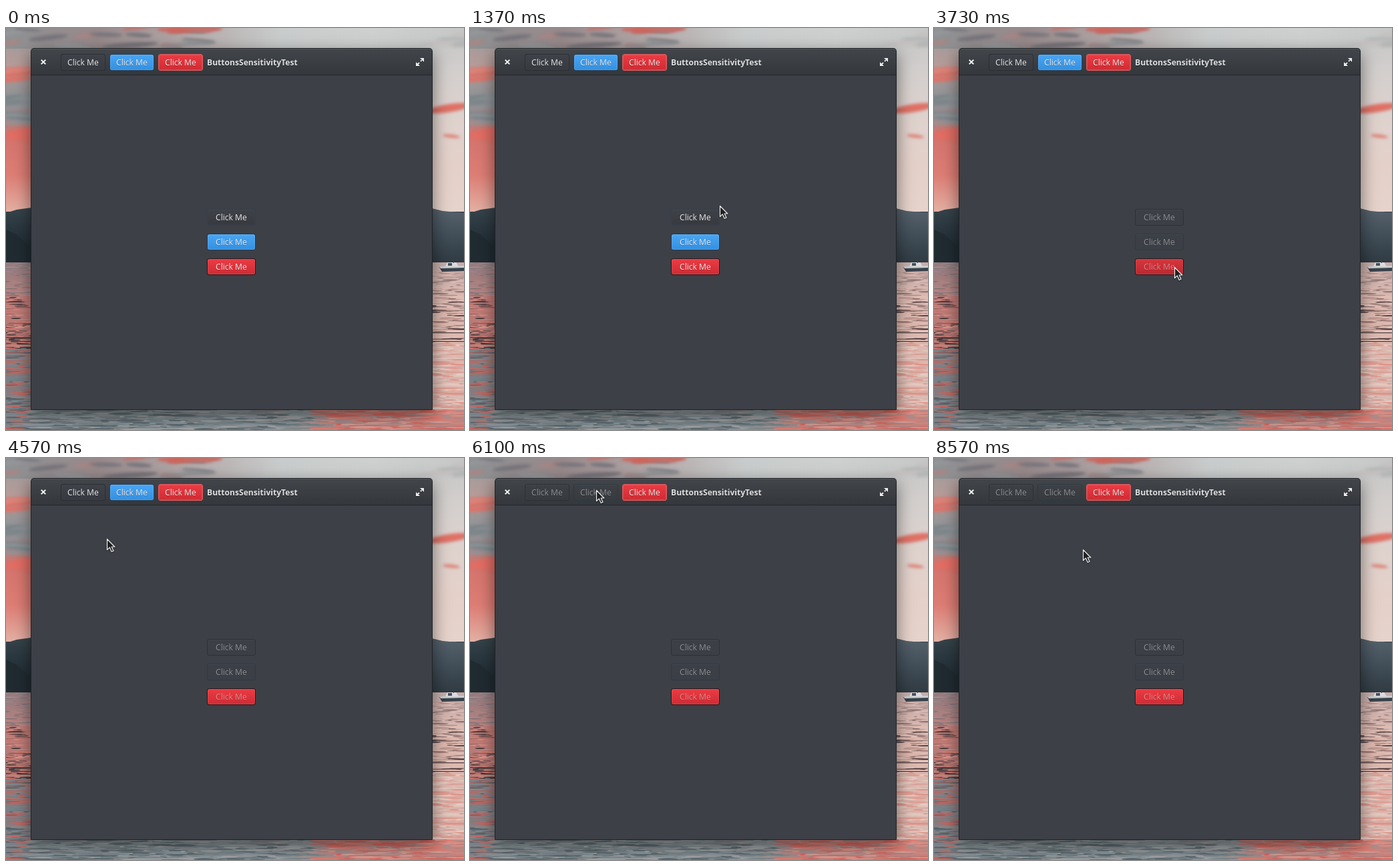
An HTML page with a canvas for the animation above (9310 ms loop, 686 by 602 pixels).

```html
<!DOCTYPE html>
<html lang="en">
<head>
<meta charset="utf-8">
<title>ButtonsSensitivityTest</title>
<style>
html, body { margin: 0; width: 100%; height: 100%; overflow: hidden; background: #3d4047; }
canvas { display: block; }
</style>
</head>
<body>
<canvas id="stage" width="686" height="602"></canvas>
<script>
const W = 686, H = 602, LOOP = 9310;
const FONT = '12.1px "Open Sans", "Noto Sans", sans-serif';
const stage = document.getElementById('stage').getContext('2d');
let g = stage;

const clamp = v => Math.max(0, Math.min(1, v));
const ramp = (t, start, length) => clamp((t - start) / length);
const easeOut = u => 1 - (1 - u) ** 2;

let seed = 97;
const random = () => (seed = (seed * 16807) % 2147483647) / 2147483647;
const between = (a, b) => a + (b - a) * random();
const pick = list => list[Math.floor(random() * list.length)];

function blend(x0, y0, x1, y1, colors) {
  const fill = g.createLinearGradient(x0, y0, x1, y1);
  colors.forEach((c, i) => fill.addColorStop(i / (colors.length - 1), c));
  return fill;
}
const down = (y0, y1, ...colors) => blend(0, y0, 0, y1, colors);
const across = (...colors) => blend(0, 0, W, 0, colors);

function rect(x, y, w, h, fill) {
  g.fillStyle = fill;
  g.fillRect(x, y, w, h);
}

function box(x, y, w, h, r, fill) {
  g.beginPath();
  g.roundRect(x, y, w, h, r);
  g.fillStyle = fill;
  g.fill();
}

function outline(x, y, w, h, r, color) {
  g.beginPath();
  g.roundRect(x + .5, y + .5, w - 1, h - 1, r);
  g.strokeStyle = color;
  g.lineWidth = 1;
  g.stroke();
}

function shape(color, ...points) {
  g.beginPath();
  points.forEach(([x, y]) => g.lineTo(x, y));
  g.closePath();
  g.fillStyle = color;
  g.fill();
}

function oval(x, y, rx, ry, color, tilt = 0) {
  g.beginPath();
  g.ellipse(x, y, rx, ry, tilt, 0, Math.PI * 2);
  g.fillStyle = color;
  g.fill();
}

function clouds(count, x0, x1, y0, y1, colors) {
  for (let i = 0; i < count; i++) {
    oval(between(x0, x1), between(y0, y1), between(14, 45), between(2, 5), pick(colors), between(-.2, .15));
  }
}

// Ripples grow longer and thicker towards the viewer.
function ripples(x0, x1, y0, y1, colors) {
  const count = (x1 - x0) * (y1 - y0) / 26;
  for (let i = 0; i < count; i++) {
    const y = between(y0, y1), depth = (y - 350) / 250;
    oval(between(x0, x1), y, between(3, 12 + 16 * depth), between(.3, .6 + depth), pick(colors));
  }
}

function drawSky() {
  const mid = W / 2;
  rect(0, 0, mid, 275, down(0, 275, '#989b9d', '#b59c99', '#8c9296', '#d4746c', '#dd7d74', '#e4b0a4'));
  rect(mid, 0, mid, 275, down(0, 275, '#c3c5c5', '#d3cfcd', '#dfd2cd', '#e4d0c9', '#e6d3cb'));
  rect(0, 0, W, 31, across('#8f9294', '#97898b', '#b3a8a8', '#c9cccc', '#ced0cf', '#c6c7c7'));
  g.filter = 'blur(2px)';
  clouds(14, 0, 330, 0, 30, ['#77747b', '#94979a', '#a98585']);
  clouds(7, 170, 310, -2, 5, ['#cb665e', '#c1706a']);
  clouds(5, -10, 20, 62, 85, ['#dc7369', '#d9857a']);
  clouds(8, -10, 30, 98, 142, ['#7d868b', '#8e9599']);
  clouds(3, 0, 40, 155, 172, ['#e16d64']);
  clouds(5, 650, 690, 0, 25, ['#b4b5b6', '#c5c1c0']);
  oval(664, 120, 34, 6, '#df7166', -.15);
  oval(667, 162, 13, 2.5, '#dd8378', .12);
  g.filter = 'none';
}

function drawShore() {
  shape(down(270, 350, '#37434b', '#26323a', '#1c262c'),
    [0, 277], [16, 272], [38, 269], [38, 351], [0, 351]);
  shape('#202b31', [0, 302], [15, 309], [38, 329], [38, 351], [0, 351]);
  shape(down(270, 352, '#56616b', '#414e58', '#2f3a42'),
    [638, 270], [654, 274], [686, 277], [686, 354], [638, 354]);
}

function drawWater() {
  const mid = W / 2;
  rect(0, 351, mid, 251, down(350, 602, '#8c7c81', '#c4807b', '#a8716e', '#857a7e', '#778388'));
  rect(mid, 351, mid, 251, down(350, 602, '#c6adaa', '#dcbab1', '#dbb7ae', '#e1c3ba', '#c49b95'));
  rect(0, 571, W, 31, across('#7d7f83', '#7b868b', '#8b9093', '#a68a88', '#c88179'));
  ripples(0, 40, 352, 402, ['#a38a8c', '#7d7379', '#c48982']);
  ripples(0, 40, 402, 480, ['#353236', '#5c4447', '#d67e74', '#dd9388', '#c1726c']);
  ripples(0, 40, 480, 602, ['#75838a', '#566269', '#c9645c', '#8d8487']);
  ripples(636, W, 366, 405, ['#b08b88', '#e2beb4', '#836a6c']);
  ripples(636, W, 405, 470, ['#463a3d', '#a17874', '#e4c4bb', '#dfb4aa']);
  ripples(636, W, 470, 572, ['#e6cbc2', '#d6b1a9', '#df9489']);
  ripples(40, 470, 571, H, ['#76848a', '#8b979c', '#5b686e', '#a0a2a4']);
  ripples(470, W, 571, H, ['#d4675f', '#df7b71', '#a98c8b', '#d59b93']);
  for (const [x, y] of [[0, 463], [638, 456], [638, 469]]) rect(x, y, 48, 1, '#3a3034');
}

function drawBoat() {
  shape('#38424b', [649, 358], [686, 357], [686, 364], [653, 365]);
  shape('#c9cdd0', [649, 357], [686, 356], [686, 359], [651, 360]);
  shape('#dcdcdd', [658, 357], [661, 351], [674, 351], [678, 357]);
  rect(662, 352, 6, 4, '#46515b');
  rect(670, 346, 1, 6, '#3b434a');
}

function drawWindow() {
  g.save();
  g.shadowColor = 'rgba(0,0,0,.5)';
  g.shadowBlur = 26;
  g.shadowOffsetY = 8;
  box(37, 30, 602, 542, [5, 5, 1, 1], '#1f2226');
  g.restore();
  box(38, 31, 600, 540, [4, 4, 0, 0], '#3d4047');
  box(38, 31, 600, 39, [4, 4, 0, 0], down(31, 70, '#42454a', '#34373b'));
  rect(41, 31, 594, 1, 'rgba(255,255,255,.09)');
  rect(38, 70, 600, 1, '#24272b');
  drawIcons();
  g.font = 'bold ' + FONT;
  label('ButtonsSensitivityTest', 301, 56, '#dedfe0', .45);
}

function drawIcons() {
  const white = '#f0f0f0';
  g.save();
  g.shadowColor = 'rgba(0,0,0,.5)';
  g.shadowOffsetY = 1;
  g.strokeStyle = white;
  g.lineWidth = 2;
  g.beginPath();
  for (const s of [-1, 1]) {
    g.moveTo(56 - 3.3 * s, 47.7);
    g.lineTo(56 + 3.3 * s, 54.3);
    g.moveTo(620 + s, 51 - s);
    g.lineTo(620 + 4.5 * s, 51 - 4.5 * s);
  }
  g.stroke();
  for (const s of [-1, 1]) shape(white, [620, 51 - 6 * s], [620 + 6 * s, 51 - 6 * s], [620 + 6 * s, 51]);
  g.restore();
}

function label(text, x, y, color, shade) {
  g.fillStyle = `rgba(0,0,0,${shade})`;
  g.fillText(text, x, y + 1);
  g.fillStyle = color;
  g.fillText(text, x, y);
}

const LOOKS = [
  { top: '#3f4248', bottom: '#36393f', barEdge: '#282b30', edge: '#2b4057', offEdge: '#2d3035', gloss: .025 },
  { top: '#4ba7f6', bottom: '#338fdf', barEdge: '#24435f', edge: '#24384c', offEdge: '#2e3a43', gloss: .13 },
  { top: '#ed3c44', bottom: '#cf2a33', barEdge: '#dc5b60', edge: '#2c1518', stays: true, gloss: .1 }
];
const BAR_CLICKS = [5070, 5770, 6770], BODY_CLICKS = [1670, 2780, 3610];

const BUTTONS = LOOKS.flatMap((look, i) => [
  { look, x: 82 + 73 * i, y: 39, w: 67, pad: 10, edge: look.barEdge, click: BAR_CLICKS[i], bar: true },
  { look, x: 301, y: Math.round(270.5 + 37 * i), w: 73, pad: 13, edge: look.edge, click: BODY_CLICKS[i] }
]);

function drawButton({ look, x, y, w, pad, edge, click, bar }, t) {
  const h = 25, textOff = ramp(t, click + 50, 80), off = ramp(t, click + 130, 180);
  const pressed = ramp(t, click, 50) * (1 - off);

  if (!look.stays) {
    g.globalAlpha = off;
    box(x + 1, y + 1, w - 2, h - 2, 2, bar ? down(y, y + h, '#3d4045', '#373a3e') : '#3c3f46');
    outline(x, y, w, h, 2.5, look.offEdge);
    rect(x + 2, y + 1, w - 4, 1, 'rgba(255,255,255,.04)');
    g.globalAlpha = 1 - off;
  }
  box(x + 1, y + 1, w - 2, h - 2, 2, down(y, y + h, look.top, look.bottom));
  outline(x, y, w, h, 2.5, edge);
  outline(x + 1, y + 1, w - 2, h - 2, 1.5, `rgba(255,255,255,${look.gloss})`);
  rect(x + 1, y + 1, w - 2, h - 2, `rgba(0,0,0,${.09 * pressed})`);

  const fade = bar && look.stays ? 0 : textOff;
  g.font = FONT;
  g.globalAlpha = 1 - fade;
  label('Click Me', x + pad, y + 17, '#ececed', .3);
  g.globalAlpha = fade;
  label('Click Me', x + pad, y + 17, look.stays ? '#d98d8e' : '#8e9094', .22);
  g.globalAlpha = 1;
}

// Each move eases to its goal along an arc given by its bend.
const MOVES = [
  { start: 770, end: 1530, to: [352, 277], bend: [50, -118] },
  { start: 2170, end: 2570, to: [348, 326], bend: [34, 22] },
  { start: 3230, end: 3630, to: [360, 358], bend: [10, 0] },
  { start: 4130, end: 5030, to: [112, 48], bend: [-35, -10] },
  { start: 5330, end: 5630, to: [189, 48], bend: [-6, 4] },
  { start: 6330, end: 6600, to: [247, 50], bend: [60, 6] },
  { start: 7630, end: 7870, to: [223, 137], bend: [45, 0] }
];

function pointerAt(t) {
  let spot = [690, 405];
  for (const { start, end, to, bend } of MOVES) {
    const e = easeOut(ramp(t, start, end - start));
    spot = spot.map((from, k) => from + (to[k] - from) * e + bend[k] * Math.sin(Math.PI * e));
    if (e < 1) break;
  }
  return spot.map(Math.round);
}

function drawPointer(t) {
  const [x, y] = pointerAt(t);
  g.save();
  g.translate(x + .5, y + .5);
  g.shadowColor = 'rgba(0,0,0,.35)';
  g.shadowBlur = 2;
  g.shadowOffsetY = 1;
  shape('#202224', [0, 0], [0, 16], [3.8, 12.4], [6.7, 18.8], [9.5, 17.5], [6.7, 11.5], [11.3, 11.5]);
  g.strokeStyle = '#f2f2f2';
  g.lineWidth = 1.2;
  g.lineJoin = 'round';
  g.stroke();
  g.restore();
}

function makeScene() {
  const canvas = document.createElement('canvas');
  canvas.width = W;
  canvas.height = H;
  g = canvas.getContext('2d');
  drawSky();
  drawShore();
  drawWater();
  drawBoat();
  drawWindow();
  g = stage;
  return canvas;
}

const scene = makeScene();
const start = performance.now();

function frame() {
  const t = Math.max(0, performance.now() - start) % LOOP;
  g.drawImage(scene, 0, 0);
  BUTTONS.forEach(b => drawButton(b, t));
  drawPointer(t);
  requestAnimationFrame(frame);
}
frame();
</script>
</body>
</html>
```
